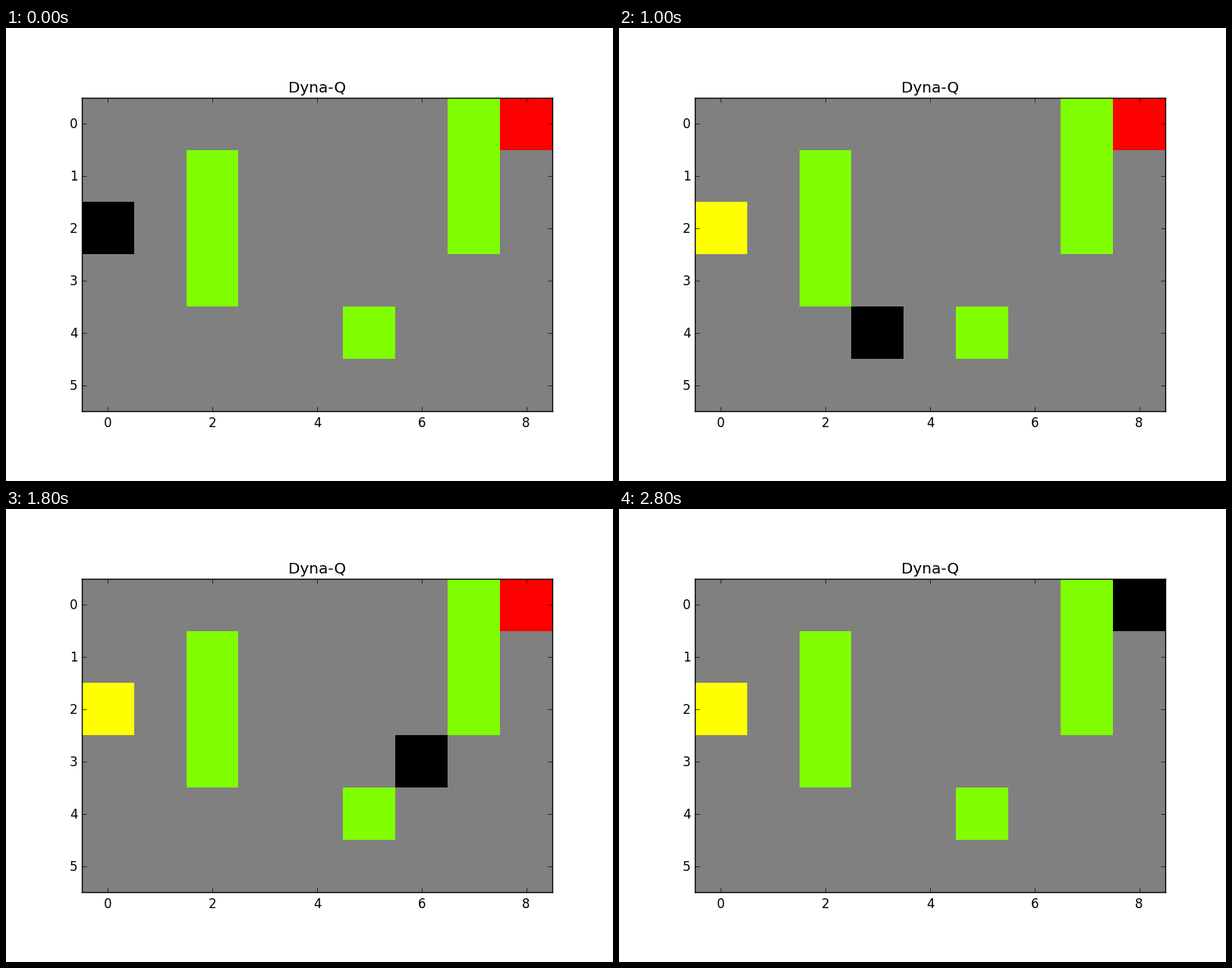
These frames come from a looping animation (800 px wide and 597 px high, 3000 ms). A matplotlib script:

```python
import matplotlib.pyplot as plt
from matplotlib.animation import FuncAnimation
from matplotlib.patches import Rectangle
from matplotlib.transforms import Affine2D

W, H, DPI = 800, 597, 100
ROWS, COLS = 6, 9
LEFT, RIGHT = 100, 720
SIZE = (RIGHT - LEFT) / COLS * ROWS
BOTTOM = (H - SIZE) / 2

START, GOAL = (2, 0), (0, 8)
WALLS = [(1, 2), (2, 2), (3, 2), (4, 5), (0, 7), (1, 7), (2, 7)]
MOVES = "DRDRRURRRRRUUU"
STEPS = {"U": (-1, 0), "D": (1, 0), "L": (0, -1), "R": (0, 1)}

plt.rcParams.update({"font.family": "DejaVu Sans", "font.size": 12})


def walk(start, moves):
    path = [start]
    for m in moves:
        (r, c), (dr, dc) = path[-1], STEPS[m]
        path.append((r + dr, c + dc))
    return path


def bounds(row, col, rows=1, cols=1):
    """Whole-pixel box of a block of cells, measured from the bottom left."""
    x0, x1 = (round(99.75 + 68.9 * c) for c in (col, col + cols))
    y0, y1 = (H - round(91.65 + 68.9 * r) for r in (row + rows, row))
    return x0, y0, x1 - x0, y1 - y0


def block(color, *cells, zorder=0.5):
    x, y, w, h = bounds(*cells)
    return ax.add_patch(Rectangle((x, y), w, h, fc=color, lw=0, aa=False,
                                  transform=pixels, clip_on=False,
                                  zorder=zorder))


def label(text, xy, offset, ha):
    ax.annotate(text, xy, offset, textcoords="offset pixels", ha=ha,
                va="baseline", annotation_clip=False)


fig = plt.figure(figsize=(W / DPI, H / DPI), dpi=DPI, facecolor="white")
pixels = Affine2D().scale(1 / W, 1 / H) + fig.transFigure
ax = fig.add_axes([LEFT / W, BOTTOM / H, (RIGHT - LEFT) / W, SIZE / H])
ax.set(xlim=(-0.5, COLS - 0.5), ylim=(ROWS - 0.5, -0.5),
       xticks=range(0, COLS, 2), yticks=range(ROWS))
ax.autoscale(False)
ax.set_axisbelow(False)
ax.tick_params(direction="in", length=4, width=0.5, top=True, right=True,
               labelbottom=False, labelleft=False)
for spine in ax.spines.values():
    spine.set_linewidth(1)
ax.set_title("Dyna-Q", fontsize=14.4, pad=5)

for c in range(0, COLS, 2):
    label(str(c), (c, ROWS - 0.5), (0, -21), "center")
for r in range(ROWS):
    label(str(r), (-0.5, r), (-5.56, -6.2), "right")

block("gray", 0, 0, ROWS, COLS, zorder=0.1)
for cell in WALLS:
    block("chartreuse", *cell)
block("yellow", *START)
block("red", *GOAL)
agent = block("black", *START, zorder=0.8)

path = walk(START, MOVES)


def update(i):
    agent.set_bounds(*bounds(*path[i]))
    return [agent]


anim = FuncAnimation(fig, update, frames=len(path), interval=200,
                     repeat=True, repeat_delay=0, blit=False)
plt.show()
```
